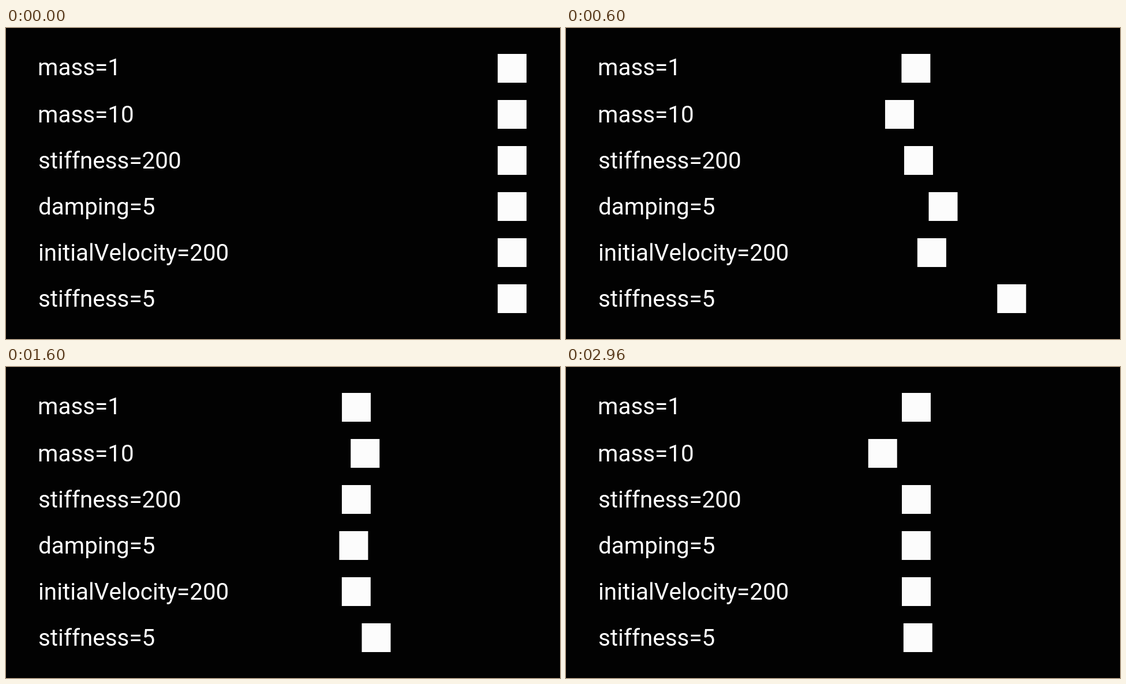
An HTML page that plays this animation: 960 by 540 pixels, repeating every 3000 ms.

```html
<!DOCTYPE html>
<html lang="en">
<head>
<meta charset="utf-8">
<title>Spring parameters</title>
<style>
  html, body { margin: 0; width: 100%; height: 100%; overflow: hidden; background: #020202; }
  svg { display: block; width: 960px; height: 540px; }
  text { font: 40.4px Roboto, sans-serif; font-kerning: none; fill: #fff; }
  rect { fill: #fcfcfc; }
</style>
</head>
<body>
<svg id="stage" viewBox="0 0 960 540"></svg>
<script>
const LOOP = 3000, STEP = 40, SIM_RATE = 60;
const FROM = 852, TO = 582, SIZE = 50;

const springs = [
  { label: 'mass=1', x: 55, baseline: 82 },
  { label: 'mass=10', x: 55, baseline: 164, mass: 10 },
  { label: 'stiffness=200', x: 56, baseline: 244, stiffness: 200 },
  { label: 'damping=5', x: 56, baseline: 324, damping: 5 },
  { label: 'initialVelocity=200', x: 56, baseline: 404, velocity: 20 },
  { label: 'stiffness=5', x: 56, baseline: 484, stiffness: 5 },
];

// Remaining distance, from 1 at the start to 0 at rest; damping is capped at critical.
function displacement({ mass = 1, stiffness = 100, damping = 10, velocity = 0 }, t) {
  const omega = Math.sqrt(stiffness / mass);
  const beta = Math.min(damping / (2 * mass), omega);
  const decay = Math.exp(-beta * t);
  if (beta === omega) return decay * (1 + (beta - velocity) * t);
  const freq = Math.sqrt(omega ** 2 - beta ** 2);
  return decay * (Math.cos(freq * t) + (beta - velocity) / freq * Math.sin(freq * t));
}

const stage = document.getElementById('stage');

function add(tag, attrs, content = '') {
  const node = document.createElementNS('http://www.w3.org/2000/svg', tag);
  for (const name in attrs) node.setAttribute(name, attrs[name]);
  node.textContent = content;
  return stage.appendChild(node);
}

const boxes = springs.map(({ label, x, baseline }, i) => {
  add('text', { x, y: baseline }, label);
  return add('rect', { x: FROM, y: 45 + 80 * i, width: SIZE, height: SIZE });
});

// The picture updates every STEP ms and shows the latest tick of a 60 Hz simulation.
function draw(ms) {
  const shown = Math.floor(ms % LOOP / STEP) * STEP;
  const t = Math.floor(shown * SIM_RATE / 1000) / SIM_RATE;
  springs.forEach((spring, i) => {
    boxes[i].setAttribute('x', TO + (FROM - TO) * displacement(spring, t));
  });
}

const start = performance.now();
function tick() {
  draw(performance.now() - start);
  requestAnimationFrame(tick);
}
draw(0);
requestAnimationFrame(tick);
</script>
</body>
</html>
```
